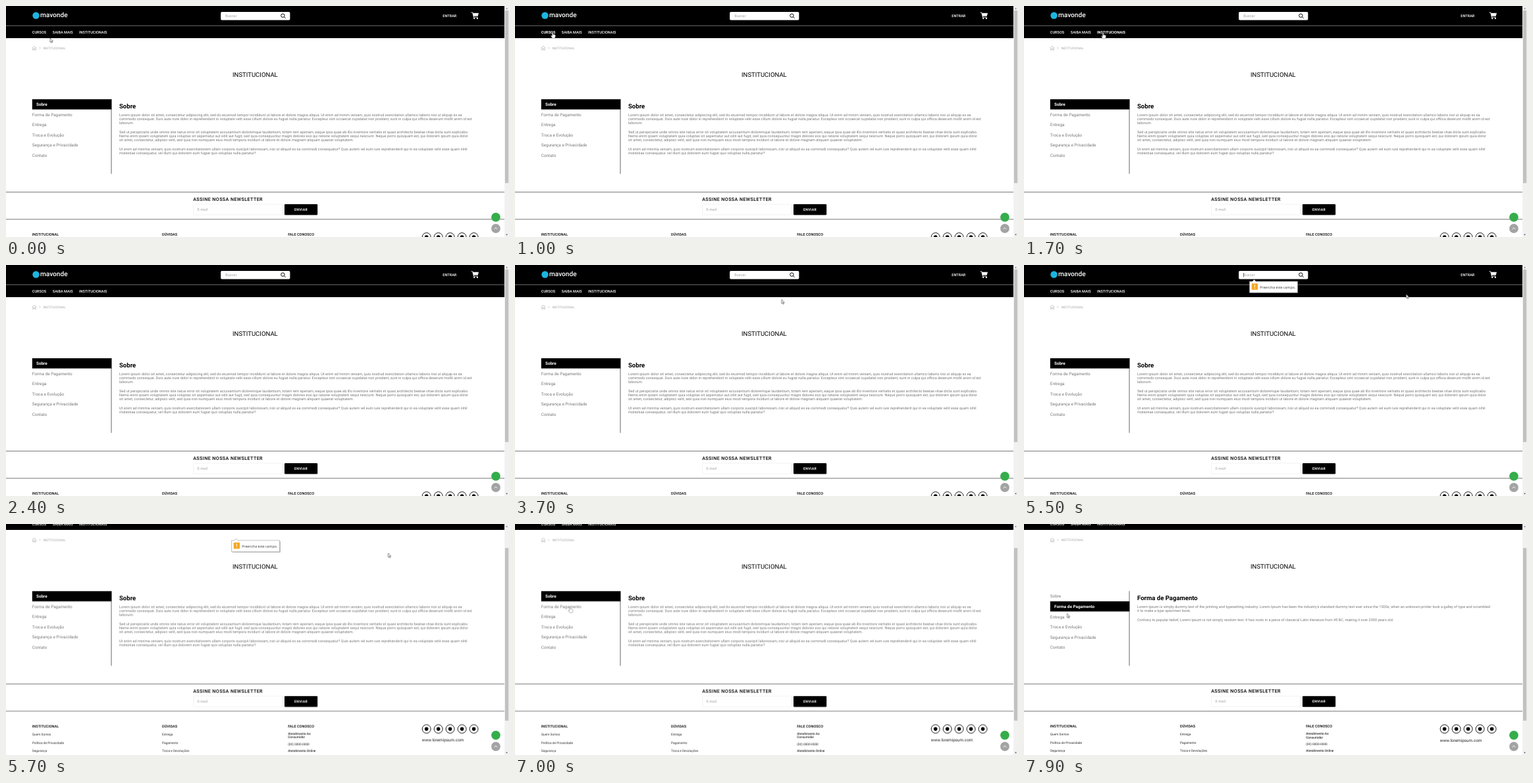
These frames come from a looping animation (764 px wide and 352 px high, 8 s). An HTML page:

```html
<!DOCTYPE html>
<html lang="pt-BR">
<head>
<meta charset="utf-8">
<title>Institucional</title>
<style>
  html, body { margin: 0; width: 100%; height: 100%; overflow: hidden; background: #fff; }
  svg { display: block; width: 764px; height: 352px; font-family: Roboto, sans-serif; text-rendering: geometricPrecision; }
  .s12 { font-size: 4.77px; }
  .s13 { font-size: 5.17px; }
  .s14 { font-size: 5.57px; }
  .s16 { font-size: 6.37px; }
  .s24 { font-size: 9.55px; }
  .medium { font-weight: 500; }
  .bold { font-weight: 700; }
  .white { fill: #fff; }
  .grey { fill: #777; }
  .soft { fill: #a4a4a4; }
  .line { fill: none; stroke: #000; }

  .anim { animation: 8s step-end infinite; }
  #page { animation-name: scroll; }
  #thumb { animation-name: thumb; }
  #nav1 { animation-name: nav1; }
  #nav2 { animation-name: nav2; }
  #nav3 { animation-name: nav3; }
  #caret { animation-name: caret; }
  #tip { animation-name: tip; transform-origin: 342.6px 25px; }
  #about { animation-name: about; }
  #payment { animation-name: payment; }
  #pointer { animation-name: path; }
  #arrow { animation-name: arrow; }
  #hand { animation-name: hand; }

  @keyframes scroll { 0% { transform: none; } 71.25%, 100% { transform: translateY(-39.8px); } }
  @keyframes thumb { 0% { transform: none; } 71.25%, 100% { transform: translateY(29.8px); } }
  @keyframes nav1 { 0%, 15%, 100% { font-weight: 500; } 5% { font-weight: 700; } }
  @keyframes nav2 { 0%, 20%, 100% { font-weight: 500; } 15% { font-weight: 700; } }
  @keyframes nav3 { 0%, 23.75%, 100% { font-weight: 500; } 20% { font-weight: 700; } }
  @keyframes caret { 0%, 61.25%, 71.25%, 100% { opacity: 0; } 55%, 67.5% { opacity: 1; } }
  @keyframes tip {
    0%, 72.5%, 100% { opacity: 0; transform: none; }
    56.25% { opacity: .35; transform: scale(.96); }
    57.5% { opacity: .7; transform: scale(.975); }
    58.75% { opacity: 1; transform: none; }
  }
  @keyframes about { 0% { visibility: visible; } 93.75%, 100% { visibility: hidden; } }
  @keyframes payment { 0% { visibility: hidden; } 93.75%, 100% { visibility: visible; } }
  @keyframes arrow { 0%, 25%, 37.5%, 61.25%, 97.5%, 100% { opacity: 1; } 5%, 30%, 53.75%, 85% { opacity: 0; } }
  @keyframes hand { 0%, 25%, 37.5%, 61.25%, 97.5%, 100% { opacity: 0; } 5%, 33.75%, 53.75%, 85% { opacity: 1; } }
  /* the pointer moves ten times a second */
  @keyframes path {
    0% { transform: translate(67px, 49px); }
    1.25% { transform: translate(67px, 49px); animation-timing-function: steps(7); }
    10% { transform: translate(57px, 40px); }
    12.5% { transform: translate(57px, 40px); animation-timing-function: steps(3); }
    16.25% { transform: translate(88px, 40px); animation-timing-function: steps(5); }
    22.5% { transform: translate(128px, 41px); animation-timing-function: steps(6); }
    30% { transform: translate(44.5px, 65.5px); }
    36.25% { transform: translate(44.5px, 65.5px); animation-timing-function: steps(9); }
    47.5% { transform: translate(450px, 51px); animation-timing-function: steps(5); }
    53.75% { transform: translate(422px, 13.7px); }
    58.75% { transform: translate(422px, 13.7px); animation-timing-function: steps(6); }
    66.25% { transform: translate(589px, 45px); animation-timing-function: steps(2); }
    68.75% { transform: translate(580.5px, 44.5px); }
    75% { transform: translate(580.5px, 44.5px); animation-timing-function: steps(7); }
    83.75% { transform: translate(92px, 139px); animation-timing-function: steps(2); }
    86.25% { transform: translate(83.5px, 126.2px); }
    92.5% { transform: translate(83.5px, 126.2px); animation-timing-function: steps(5); }
    98.75%, 100% { transform: translate(65.5px, 136.5px); }
  }
</style>
</head>
<body>
<svg viewBox="0 0 764 352">
  <rect width="764" height="352" fill="#fff"/>
  <g id="page" class="anim">
    <!-- header -->
    <rect width="757.2" height="49"/>
    <path d="M0 30H757.2" stroke="#fff" stroke-width=".45"/>
    <circle cx="45.5" cy="14.5" r="5.2" fill="#1cb5e0"/>
    <text class="white medium" x="52" y="17.4" font-size="10.1">mavonde</text>
    <rect x="326.2" y="9.1" width="105.2" height="12.3" rx="1.6" class="white"/>
    <text class="s14 soft" x="333.3" y="17">Buscar</text>
    <path id="caret" class="anim" d="M333.4 12V18.5" stroke="#000" stroke-width=".6"/>
    <g class="line" stroke-width="1"><circle cx="420.4" cy="14.6" r="2.7"/><path d="M422.4 16.6L424.6 18.8"/></g>
    <text class="s14 white medium" x="663.3" y="16.7">ENTRAR</text>
    <g class="white">
      <path d="M706.4 9.4H709L709.5 10.8H718L716.7 15.6H710.7L710.9 16.7H716.8V17.6H710.1L708.3 10.3H706.4Z"/>
      <circle cx="711.2" cy="18.9" r="1.1"/><circle cx="715.9" cy="18.9" r="1.1"/>
    </g>
    <g class="s14 white medium">
      <text id="nav1" class="anim" x="39.8" y="41.8">CURSOS</text>
      <text id="nav2" class="anim" x="70.8" y="41.8">SAIBA MAIS</text>
      <text id="nav3" class="anim" x="111" y="41.8">INSTITUCIONAIS</text>
    </g>

    <!-- breadcrumb and title -->
    <g class="line" style="stroke:#aaa" stroke-width=".6">
      <path d="M39.9 64L43 61L46.1 64M40.7 63.4V67.2H42.1V64.9H43.9V67.2H45.3V63.4"/>
      <path d="M50.7 62.5L52.2 64L50.7 65.5"/>
    </g>
    <text class="s12 soft" x="56.4" y="65.7">INSTITUCIONAL</text>
    <text class="s24" x="344" y="107.9">INSTITUCIONAL</text>

    <!-- side menu -->
    <path d="M160 142V255.8" class="line" stroke-width=".6"/>
    <g class="s16 grey">
      <text x="39.8" y="183.4">Entrega</text>
      <text x="39.8" y="198.9">Troca e Evolução</text>
      <text x="39.8" y="214.4">Segurança e Privacidade</text>
      <text x="39.8" y="229.9">Contato</text>
    </g>

    <g id="about" class="anim">
      <rect x="39.8" y="142.1" width="120.5" height="15.5"/>
      <text class="s16 white bold" x="46" y="152.2">Sobre</text>
      <text class="s16 grey" x="39.8" y="167.8">Forma de Pagamento</text>
      <text class="s24 bold" x="172" y="156">Sobre</text>
      <g class="s14 grey" transform="translate(172 167.8)">
        <text>Lorem ipsum dolor sit amet, consectetur adipiscing elit, sed do eiusmod tempor incididunt ut labore et dolore magna aliqua. Ut enim ad minim veniam, quis nostrud exercitation ullamco laboris nisi ut aliquip ex ea</text>
        <text y="6.1">commodo consequat. Duis aute irure dolor in reprehenderit in voluptate velit esse cillum dolore eu fugiat nulla pariatur. Excepteur sint occaecat cupidatat non proident, sunt in culpa qui officia deserunt mollit anim id est</text>
        <text y="12.2">laborum.</text>
        <text y="26">Sed ut perspiciatis unde omnis iste natus error sit voluptatem accusantium doloremque laudantium, totam rem aperiam, eaque ipsa quae ab illo inventore veritatis et quasi architecto beatae vitae dicta sunt explicabo.</text>
        <text y="32.1">Nemo enim ipsam voluptatem quia voluptas sit aspernatur aut odit aut fugit, sed quia consequuntur magni dolores eos qui ratione voluptatem sequi nesciunt. Neque porro quisquam est, qui dolorem ipsum quia dolor</text>
        <text y="38.2">sit amet, consectetur, adipisci velit, sed quia non numquam eius modi tempora incidunt ut labore et dolore magnam aliquam quaerat voluptatem.</text>
        <text y="52">Ut enim ad minima veniam, quis nostrum exercitationem ullam corporis suscipit laboriosam, nisi ut aliquid ex ea commodi consequatur? Quis autem vel eum iure reprehenderit qui in ea voluptate velit esse quam nihil</text>
        <text y="58.1">molestiae consequatur, vel illum qui dolorem eum fugiat quo voluptas nulla pariatur?</text>
      </g>
    </g>

    <g id="payment" class="anim">
      <text class="s16 grey" x="39.8" y="152.2">Sobre</text>
      <rect x="39.8" y="157.6" width="120.5" height="15.5"/>
      <text class="s16 white bold" x="46" y="167.8">Forma de Pagamento</text>
      <text class="s24 bold" x="172" y="156">Forma de Pagamento</text>
      <g class="s14 grey" transform="translate(172 167.8)">
        <text>Lorem Ipsum is simply dummy text of the printing and typesetting industry. Lorem Ipsum has been the industry's standard dummy text ever since the 1500s, when an unknown printer took a galley of type and scrambled</text>
        <text y="6.1">it to make a type specimen book.</text>
        <text y="19.9">Contrary to popular belief, Lorem Ipsum is not simply random text. It has roots in a piece of classical Latin literature from 45 BC, making it over 2000 years old.</text>
      </g>
    </g>

    <!-- newsletter -->
    <path d="M0 283.6H757.2M0 325H757.2" class="line" stroke-width=".55"/>
    <text class="medium" x="284.2" y="296.7" font-size="7.16" letter-spacing=".4">ASSINE NOSSA NEWSLETTER</text>
    <rect x="284.7" y="302" width="135" height="16.2" rx="1.2" fill="#fff" stroke="#e4e4e4" stroke-width=".5"/>
    <text class="s14 soft" x="290.8" y="311.9">E-mail</text>
    <rect x="423" y="302" width="50.2" height="16.5" rx="1.2"/>
    <text class="s13 white bold" x="438" y="312" letter-spacing=".3">ENVIAR</text>

    <!-- footer -->
    <g class="s14 medium">
      <text x="39.8" y="349.9">INSTITUCIONAL</text>
      <text x="237" y="349.9">DÚVIDAS</text>
      <text x="428.2" y="349.9">FALE CONOSCO</text>
    </g>
    <g class="s12" fill="#222">
      <text x="39.8" y="362.3">Quem Somos</text>
      <text x="39.8" y="374.7">Política de Privacidade</text>
      <text x="39.8" y="387.1">Segurança</text>
      <text x="237" y="362.3">Entrega</text>
      <text x="237" y="374.7">Pagamento</text>
      <text x="237" y="387.1">Troca e Devoluções</text>
      <text class="medium" x="428.2" y="360.8">Atendimento Ao</text>
      <text class="medium" x="428.2" y="366.4">Consumidor</text>
      <text x="428.2" y="376.7">(00) 0000-0000</text>
      <text class="medium" x="428.2" y="387.1">Atendimento Online</text>
    </g>
    <defs>
      <g id="social"><circle r="6.5" class="line" stroke-width=".9"/><circle r="2.8"/></g>
    </defs>
    <use href="#social" x="638.7" y="352.1"/>
    <use href="#social" x="656.7" y="352.1"/>
    <use href="#social" x="674.6" y="352.1"/>
    <use href="#social" x="692.6" y="352.1"/>
    <use href="#social" x="710.6" y="352.1"/>
    <text class="s16" x="631.8" y="371.4" fill="#222">www.loremipsum.com</text>
  </g>

  <!-- floating buttons -->
  <circle cx="744" cy="321.8" r="6.9" fill="#35ad4b"/>
  <circle cx="744" cy="339" r="6.9" fill="#a3a3a3"/>
  <path d="M741.6 340.2L744 337.8L746.4 340.2" fill="none" stroke="#fff" stroke-width=".9"/>

  <!-- scrollbar -->
  <rect x="757.2" width="6.8" height="352" fill="#f1f1f1"/>
  <rect id="thumb" class="anim" x="758" y="6.8" width="5.2" height="263" fill="#c1c1c1"/>
  <path d="M759.1 4.4L760.6 2.7L762.1 4.4Z" fill="#777"/>
  <path d="M759.1 347.8L760.6 349.5L762.1 347.8Z" fill="#444"/>

  <!-- validation bubble -->
  <g id="tip" class="anim">
    <rect x="343.6" y="26" width="73.4" height="17.6" rx="1" fill="#000" opacity=".25"/>
    <path d="M342.6 25H347L349.6 22.2L352.2 25H415.6V42.2H342.6Z" fill="#fff" stroke="#999" stroke-width=".6"/>
    <rect x="345.8" y="28.3" width="9.3" height="9.5" rx=".9" fill="#f6a623"/>
    <path d="M350.4 30V34M350.4 35.1V36.2" stroke="#fff" stroke-width="1"/>
    <text x="358.2" y="35.6" font-size="5.25" fill="#333" style="font-family:'Open Sans',sans-serif">Preencha este campo.</text>
  </g>

  <!-- pointer -->
  <g id="pointer" class="anim" fill="#fff" stroke="#333" stroke-width=".6" stroke-linejoin="round">
    <path id="arrow" class="anim" d="M0 0V6.2L1.4 4.9L2.4 7.1L3.4 6.6L2.4 4.5H4.3Z"/>
    <path id="hand" class="anim" stroke="#666" stroke-width=".5" d="M-.7 .7Q0 -.5 .7 .7V3.2Q1.4 2.6 2 3.4Q2.7 2.9 3.2 3.7Q4.2 3.4 4.3 4.5V6.6L3.5 9H-.4L-2.4 5.8Q-2.4 4.6 -1.5 5.1L-.7 5.9Z"/>
  </g>
</svg>
</body>
</html>
```
